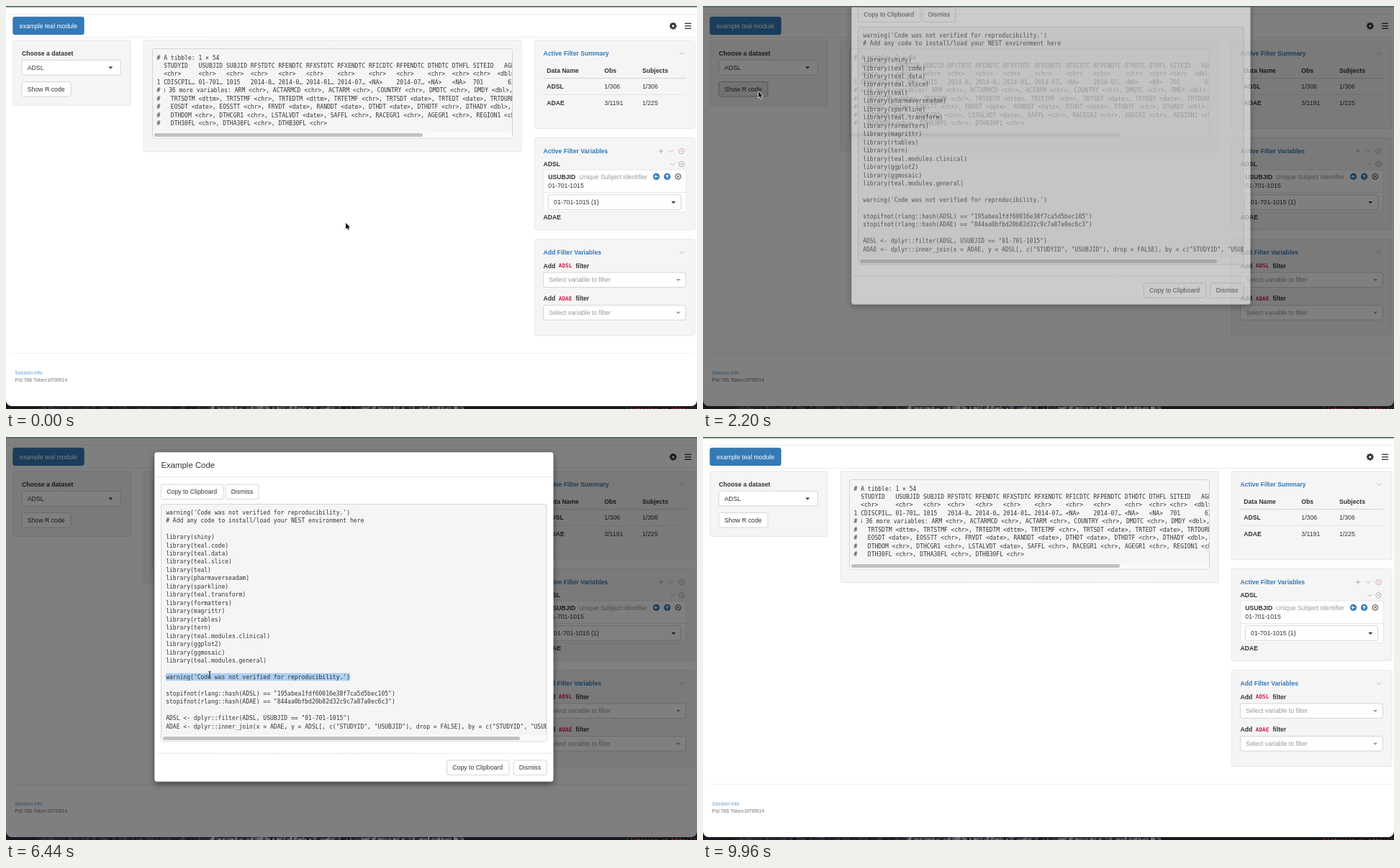
Animation of 960 by 561 pixels, one loop 10 s. Source, as an HTML page with a canvas:

```html
<!DOCTYPE html>
<html lang="en">
<head>
<meta charset="utf-8">
<title>Show R code</title>
<style>
html, body { margin: 0; width: 100%; height: 100%; overflow: hidden; background: #fff; }
canvas { display: block; width: 960px; height: 561px; }
</style>
</head>
<body>
<canvas id="stage"></canvas>
<script>
const W = 960, H = 561, LOOP = 10000;
const SANS = '"Liberation Sans", Arial, sans-serif';
const MONO = '"DejaVu Sans Mono", monospace';
const INK = '#333', LINK = '#337ab7', MUTED = '#999';
const CHAR = 4.83, STEP = 11.47;

const ratio = window.devicePixelRatio || 1;
function setup(canvas) {
  canvas.width = W * ratio;
  canvas.height = H * ratio;
  const c = canvas.getContext('2d');
  c.scale(ratio, ratio);
  return c;
}
const screen2d = setup(document.getElementById('stage'));
const layer = document.createElement('canvas');
const layer2d = setup(layer);
let g = screen2d;

const tibble = [
  '# A tibble: 1 × 54',
  '  STUDYID   USUBJID SUBJID RFSTDTC RFENDTC RFXSTDTC RFXENDTC RFICDTC RFPENDTC DTHDTC DTHFL SITEID   AGE',
  '  <chr>     <chr>   <chr>  <chr>   <chr>   <chr>    <chr>    <chr>   <chr>    <chr>  <chr> <chr>  <dbl>',
  '1 CDISCPIL… 01-701… 1015   2014-0… 2014-0… 2014-01… 2014-07… <NA>    2014-07… <NA>   <NA>  701       63',
  '# ℹ 36 more variables: ARM <chr>, ACTARMCD <chr>, ACTARM <chr>, COUNTRY <chr>, DMDTC <chr>, DMDY <dbl>,',
  '#   TRTSDTM <dttm>, TRTSTMF <chr>, TRTEDTM <dttm>, TRTETMF <chr>, TRTSDT <date>, TRTEDT <date>, TRTDURD <dbl>,',
  '#   EOSDT <date>, EOSSTT <chr>, FRVDT <date>, RANDDT <date>, DTHDT <date>, DTHDTF <chr>, DTHADY <dbl>,',
  '#   DTHDOM <chr>, DTHCGR1 <chr>, LSTALVDT <date>, SAFFL <chr>, RACEGR1 <chr>, AGEGR1 <chr>, REGION1 <chr>,',
  '#   DTH30FL <chr>, DTHA30FL <chr>, DTHB30FL <chr>'
];

const warning = "warning('Code was not verified for reproducibility.')";
const libs = ('shiny teal.code teal.data teal.slice teal pharmaverseadam sparkline teal.transform ' +
  'formatters magrittr rtables tern teal.modules.clinical ggplot2 ggmosaic teal.modules.general').split(' ');
const code = [
  warning,
  '# Add any code to install/load your NEST environment here',
  '',
  ...libs.map(name => `library(${name})`),
  '',
  warning,
  '',
  'stopifnot(rlang::hash(ADSL) == "195abea1fdf60016e38f7ca5d5bec105")',
  'stopifnot(rlang::hash(ADAE) == "844aa0bfbd20b82d32c9c7a87a0ec6c3")',
  '',
  'ADSL <- dplyr::filter(ADSL, USUBJID == "01-701-1015")',
  'ADAE <- dplyr::inner_join(x = ADAE, y = ADSL[, c("STUDYID", "USUBJID"), drop = FALSE], by = c("STUDYID", "USUBJID"))'
];

// Timing: modal opens after the first click and closes after the last one.
const OPEN = 1962, CLOSE = 8694, FADE = 150, SLIDE = 300;
const SELECT = 4640;
const presses = [[1800, 1980], [SELECT, 5920], [8600, 8770]];
const path = [
  [0, 472, 302], [760, 472, 302], [1480, 77, 119], [2440, 77, 119], [2720, 177, 147],
  [2840, 177, 147], [3120, 185, 153], [3320, 185, 153], [4320, 495, 339], [SELECT, 495, 339],
  [4960, 352, 331], [5480, 214, 332], [5920, 214, 332], [6440, 283, 331], [6840, 283, 331],
  [7840, 726, 454], [7920, 726, 454], [8360, 735.5, 457], [LOOP, 735.5, 457]
];
const showBtn = [22, 105.5, 68, 20.5], dismissBtn = [705, 450, 46, 20.5], codeBox = [215.5, 93.5, 535.5, 330.5];

const clamp = v => Math.max(0, Math.min(1, v));
const ramp = (t, start, length) => clamp((t - start) / length);
const smooth = v => v * v * (3 - 2 * v);
const inside = (p, [x, y, w, h]) => p.x >= x && p.x <= x + w && p.y >= y && p.y <= y + h;

// CSS ease-out: cubic-bezier(0, 0, .58, 1)
function easeOut(v) {
  let lo = 0, hi = 1;
  for (let i = 0; i < 20; i++) {
    const s = (lo + hi) / 2;
    if (1.74 * (1 - s) * s * s + s * s * s < v) lo = s; else hi = s;
  }
  return 3 * (1 - lo) * lo * lo + lo * lo * lo;
}

function pointer(t) {
  const i = Math.max(1, path.findIndex(p => p[0] > t));
  const [t0, x0, y0] = path[i - 1], [t1, x1, y1] = path[i];
  const k = smooth((t - t0) / (t1 - t0));
  return { x: x0 + (x1 - x0) * k, y: y0 + (y1 - y0) * k };
}

function text(s, x, mid, color = INK, size = 8.72, weight = '', family = SANS) {
  g.font = `${weight} ${size}px ${family}`;
  g.fillStyle = color;
  g.fillText(s, x, mid + size * 0.355);
}
const bold = (s, x, mid, color = INK) => text(s, x, mid, color, 8.65, 'bold');

function box(x, y, w, h, fill, stroke, r = 2.5) {
  g.beginPath();
  g.roundRect(x, y, w, h, r);
  if (fill) { g.fillStyle = fill; g.fill(); }
  if (stroke) { g.strokeStyle = stroke; g.lineWidth = 0.8; g.stroke(); }
}

function lines(points, color, width = 0.8) {
  g.beginPath();
  points.forEach(([x, y], i) => i ? g.lineTo(x, y) : g.moveTo(x, y));
  g.strokeStyle = color;
  g.lineWidth = width;
  g.stroke();
}
const rule = (x0, x1, y, color) => lines([[x0, y], [x1, y]], color);
const panel = (x, y, w, h) => box(x, y, w, h, '#f5f5f5', '#e3e3e3');
const chevron = (x, y, color) => lines([[x - 3, y - 1.5], [x, y + 1.5], [x + 3, y - 1.5]], color, 0.9);

function disc(x, y, r, fill, stroke) {
  g.beginPath();
  g.arc(x, y, r, 0, 7);
  if (fill) { g.fillStyle = fill; g.fill(); }
  if (stroke) { g.strokeStyle = stroke; g.lineWidth = 0.9; g.stroke(); }
}

function closeMark(x, y, color) {
  disc(x, y, 3.8, null, color);
  lines([[x - 1.5, y - 1.5], [x + 1.5, y + 1.5]], color, 0.9);
  lines([[x + 1.5, y - 1.5], [x - 1.5, y + 1.5]], color, 0.9);
}

function arrowDisc(x, y, turn) {
  disc(x, y, 4.6, LINK);
  g.save();
  g.translate(x, y);
  g.rotate(turn);
  lines([[0, 2.5], [0, -2.2]], '#fff', 1.1);
  lines([[-2, 0], [0, -2.2], [2, 0]], '#fff', 1.1);
  g.restore();
}

function button(label, [x, y, w, h], active) {
  box(x, y, w, h, active ? '#e6e6e6' : '#fff', active ? '#999' : '#ccc');
  text(label, x + 7.8, y + h / 2);
}

function select(label, x, y, w, h, color, caret) {
  box(x, y, w, h, '#fff', '#ccc');
  text(label, x + 7.7, y + h / 2, color);
  const cx = x + w - caret, cy = y + h / 2 - 1.2;
  g.beginPath();
  g.moveTo(cx - 3, cy);
  g.lineTo(cx + 3, cy);
  g.lineTo(cx, cy + 3);
  g.fillStyle = color;
  g.fill();
}

function verbatim(rows, x, mid, [bx, by, bw, bh], thumb, mark) {
  box(bx, by, bw, bh, '#f5f5f5', '#ccc');
  g.save();
  g.beginPath();
  g.rect(bx + 0.5, by + 0.5, bw - 1, bh - 1);
  g.clip();
  g.fillStyle = '#fafafa';
  g.fillRect(bx, by + bh - 9, bw, 9);
  if (mark) mark();
  rows.forEach((row, i) => text(row, x, mid + i * STEP, INK, 8.02, '', MONO));
  g.restore();
  box(bx + 2.5, by + bh - 7, thumb, 5, '#c1c1c1', null);
}

function gear(x, y) {
  g.fillStyle = INK;
  for (let i = 0; i < 4; i++) {
    g.save();
    g.translate(x, y);
    g.rotate(i * Math.PI / 4);
    g.fillRect(-1.2, -4.9, 2.4, 9.8);
    g.restore();
  }
  disc(x, y, 3.7, INK);
  disc(x, y, 1.6, '#fff');
}

function filterPicker(name, mid) {
  bold('Add', 746.5, mid);
  box(766, mid - 5, 22, 10.5, '#f9f2f4', null);
  text(name, 767.7, mid, '#c7254e', 7.8, 'bold', MONO);
  bold('filter', 791.5, mid);
  select('Select variable to filter', 746.5, mid + 9.3, 198, 20.5, MUTED, 10.5);
}

function drawPage(active) {
  g.fillStyle = '#fff';
  g.fillRect(0, 0, W, H);
  rule(0, W, 11.5, '#e9e9e9');
  rule(9, 957, 43.5, '#e9e9e9');
  box(9.8, 15.3, 98.4, 24.4, LINK, '#2e6da4');
  text('example teal module', 18.7, 27.7, '#fff');
  gear(926.8, 27.8);
  for (const y of [24.3, 27.8, 31.3]) lines([[943, y], [952, y]], INK, 1.3);

  panel(9.8, 47.8, 163.4, 90.6);
  bold('Choose a dataset', 22, 66);
  select('ADSL', 22, 75.3, 137.3, 20.7, INK, 14);
  button('Show R code', showBtn, active);

  panel(191.3, 47.8, 525, 155);
  verbatim(tibble, 209.5, 71.7, [203.5, 59.5, 500, 124.5], 373);

  panel(734.3, 47.8, 222.7, 122.8);
  bold('Active Filter Summary', 746.5, 66, LINK);
  chevron(939, 66, '#9fb8cc');
  const rows = [['Data Name', 'Obs', 'Subjects'], ['ADSL', '1/306', '1/306'], ['ADAE', '3/1191', '1/225']];
  rows.forEach(([a, b, c], i) => {
    const y = 89.6 + i * 22.7, put = i ? text : bold;
    bold(a, 751.3, y);
    put(b, 831.3, y);
    put(c, 884, y);
    if (i < 2) rule(746.5, 945, y + 11, i ? '#ddd' : '#ccc');
  });

  panel(734.3, 183.3, 222.7, 128.3);
  bold('Active Filter Variables', 746.5, 201.8, LINK);
  lines([[907, 202], [913, 202]], '#999');
  lines([[910, 199], [910, 205]], '#999');
  chevron(924, 202, '#c9a0a4');
  closeMark(938.5, 202, '#dba9ab');
  bold('ADSL', 746.5, 220.2);
  chevron(926, 220.2, '#aaa');
  closeMark(938.5, 220.2, '#aaa');
  box(747, 228, 198, 58.7, '#fff', '#e3e3e3');
  bold('USUBJID', 753.3, 237.6);
  text('Unique Subject Identifier', 796, 237.6, MUTED);
  arrowDisc(903.5, 237.4, -Math.PI / 2);
  arrowDisc(918.6, 237.4, 0);
  closeMark(933.8, 237.4, '#222');
  text('01-701-1015', 753.3, 249.8);
  rule(747, 945, 259.5, '#e3e3e3');
  select('01-701-1015 (1)', 753.4, 262.7, 184.4, 21, INK, 10.5);
  bold('ADAE', 746.5, 293.7);

  panel(734.3, 324.8, 222.7, 134);
  bold('Add Filter Variables', 746.5, 343.2, LINK);
  chevron(939, 343, '#9fb8cc');
  filterPicker('ADSL', 361.7);
  filterPicker('ADAE', 407.3);

  rule(9, 957, 483.5, '#eee');
  text('Session Info', 12.6, 511, '#5b9bd0', 6.92);
  text('Pid:788 Token:bf789f14', 12.6, 520.7, '#777', 6.92);
}

function drawModal(t, p) {
  g.save();
  g.shadowColor = 'rgba(0,0,0,.5)';
  g.shadowBlur = 9 * ratio;
  g.shadowOffsetY = 3 * ratio;
  box(206.3, 21.3, 554.2, 458.4, '#fff', null, 3.5);
  g.restore();
  text('Example Code', 215.4, 39.2, INK, 11.4);
  rule(206.3, 760.5, 55.5, '#e5e5e5');
  button('Copy to Clipboard', [215.5, 66, 86.5, 20.5]);
  button('Dismiss', [305, 66, 46, 20.5]);
  verbatim(code, 222.2, 104.8, codeBox, 496, () => {
    if (t < SELECT || t >= 8600) return;
    const reach = t < 5480 ? p.x : 0;
    const from = Math.max(0, Math.min(warning.length, Math.round((reach - 222.2) / CHAR)));
    g.fillStyle = '#acd0f5';
    g.fillRect(222.2 + from * CHAR, 328.7, (warning.length - from) * CHAR, 10.6);
  });
  rule(206.3, 760.5, 440.3, '#e5e5e5');
  button('Copy to Clipboard', [612.5, 450, 86.5, 20.5]);
  button('Dismiss', dismissBtn, inside(p, dismissBtn));
}

function drawDesktop() {
  g.fillStyle = '#4c6b61';
  g.fillRect(0, 0, W, 1.7);
  g.beginPath();
  g.rect(0, 549, W, 12);
  g.roundRect(0, 500, W, 57, [0, 0, 8, 8]);
  g.save();
  g.clip('evenodd');
  g.fillStyle = '#17181d';
  g.fillRect(0, 549, W, 12);
  let seed = 7;
  const rand = () => (seed = seed * 16807 % 2147483647) / 2147483647;
  for (let x = 40; x < 635; x += 3) {
    const v = 25 + rand() * (x > 265 ? 95 : 30);
    g.fillStyle = `rgb(${v},${v},${v + 8})`;
    g.fillRect(x, 557 + rand() * 2, 2 + rand() * 3, 4);
  }
  text('Listening on http://127', 862, 562.5, '#c0304c', 8.02, '', MONO);
  g.restore();
}

function drawRing(t, p) {
  for (const [down, up] of presses) {
    if (t < down || t > up + 110) continue;
    const fade = ramp(t, up, 110);
    g.globalAlpha = 1 - fade;
    disc(p.x, p.y + 0.7, 9 + 6 * ramp(t, down, 150) + 3 * fade, 'rgba(120,160,235,.15)');
    g.strokeStyle = 'rgba(100,140,215,.85)';
    g.lineWidth = 1.7;
    g.stroke();
    g.globalAlpha = 1;
  }
}

const arrowShape = new Path2D('M0 0V8.6L2 6.8L3.3 9.8L4.8 9.1L3.5 6.2H6.1Z');
const handShape = new Path2D('M-.9 .8Q0-.5 .8.8V3.6L4 4.3Q5 4.6 4.9 6L4.2 9.6H-.6L-3.4 5.8Q-3.2 4.5-2 5.2L-.9 6.2Z');

function drawPointer(t, p) {
  if (t >= 9760) return;
  const modal = t > OPEN && t < CLOSE + SLIDE;
  const hand = modal ? inside(p, dismissBtn) : t < OPEN && inside(p, showBtn);
  g.save();
  g.translate(p.x, p.y);
  if (modal && inside(p, codeBox)) {
    for (const [color, width] of [['rgba(255,255,255,.8)', 1.8], ['#111', 0.8]]) {
      lines([[-2, -4.8], [0, -4], [0, 4], [-2, 4.8]], color, width);
      lines([[2, -4.8], [0, -4], [0, 4], [2, 4.8]], color, width);
    }
  } else {
    const shape = hand ? handShape : arrowShape;
    g.lineJoin = 'round';
    g.lineWidth = 1.4;
    g.strokeStyle = hand ? '#111' : '#fff';
    g.stroke(shape);
    g.fillStyle = hand ? '#fff' : '#111';
    g.fill(shape);
  }
  g.restore();
}

function draw(t) {
  const p = pointer(t);
  g = screen2d;
  drawPage(inside(p, showBtn) || (t >= 1800 && t < SELECT));

  const dim = ramp(t, OPEN, FADE) - ramp(t, CLOSE + SLIDE, FADE);
  g.fillStyle = `rgba(0,0,0,${0.5 * dim})`;
  g.fillRect(0, 0, W, H);

  const shown = OPEN + FADE;
  const alpha = ramp(t, shown, FADE) - ramp(t, CLOSE, FADE);
  if (alpha > 0) {
    const lift = 115 * (1 - easeOut(ramp(t, shown, SLIDE)) + easeOut(ramp(t, CLOSE, SLIDE)));
    g = layer2d;
    g.clearRect(0, 0, W, H);
    drawModal(t, p);
    g = screen2d;
    g.globalAlpha = alpha;
    g.drawImage(layer, 0, -lift, W, H);
    g.globalAlpha = 1;
  }
  drawDesktop();
  drawRing(t, p);
  drawPointer(t, p);
}

function tick() {
  draw(performance.now() % LOOP);
  requestAnimationFrame(tick);
}
tick();
</script>
</body>
</html>
```
